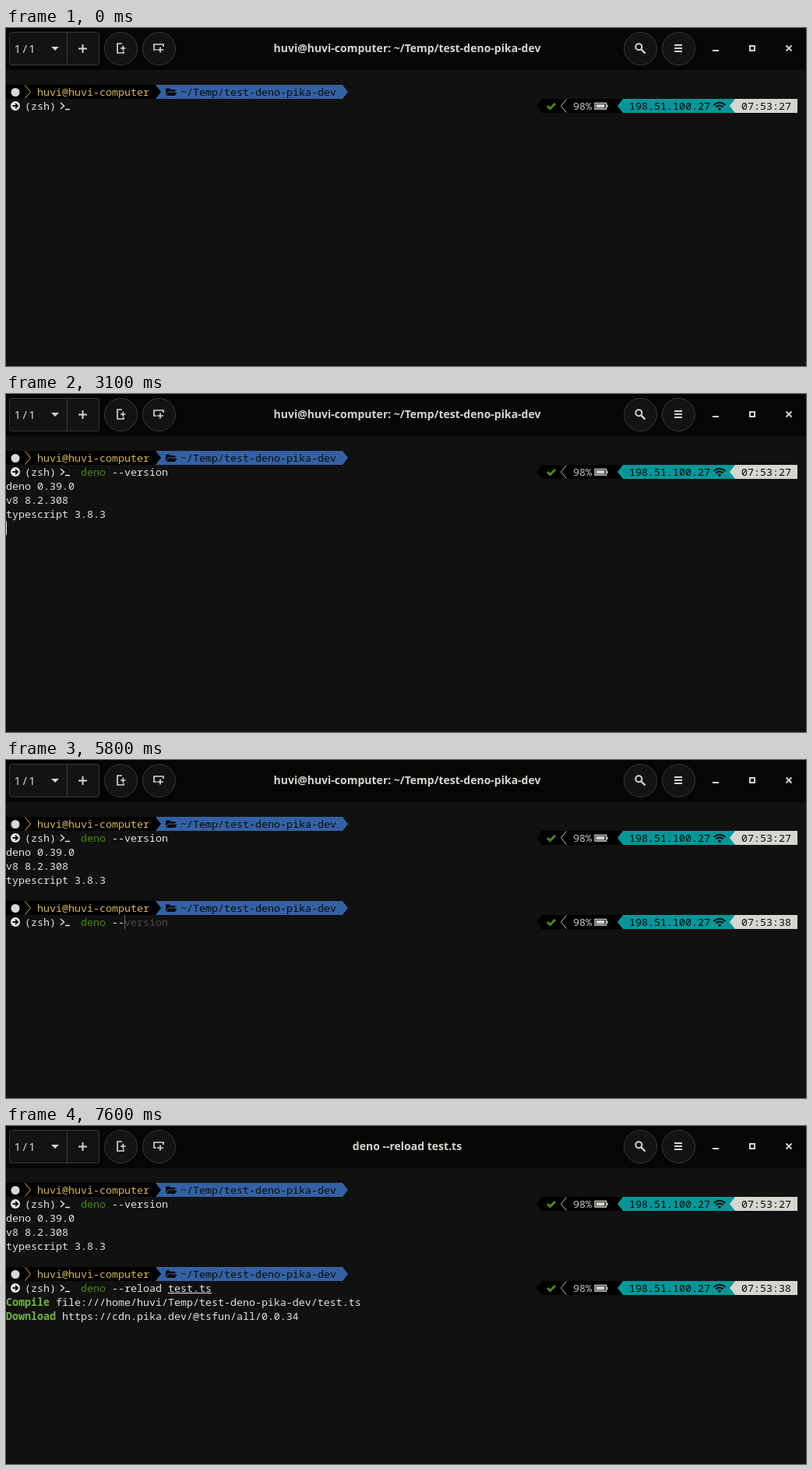
Write an HTML page that moves like this. It is 1027x434 px and loops after 8000 ms.

```html
<!DOCTYPE html>
<html lang="en">
<head>
<meta charset="utf-8">
<title>Terminal session</title>
<style>
  html, body { margin: 0; width: 100%; height: 100%; overflow: hidden; background: #111; }
  #stage { position: absolute; left: 0; top: 0; width: 1027px; height: 434px; overflow: hidden; background: #111; }
  svg { position: absolute; left: 0; top: 0; }
  .t {
    position: absolute; white-space: pre; color: #e4e4e0;
    font: 13.3333px/18px "Noto Sans Mono", monospace;
  }
  .user { color: #d7b45f; }
  .ink { color: #0b0b0b; }
  .pct { color: #c9c3bb; }
  .bad { color: #cc2020; font-weight: bold; }
  .ok { color: #468a16; }
  .log { color: #70b444; font-weight: bold; }
  .hint { color: #4b4b4b; }
  .file { text-decoration: underline; }
  #title {
    position: absolute; left: 215px; width: 600px; top: 16px; text-align: center;
    font: bold 14px/20px "Noto Sans", sans-serif; color: #d6d6d0; white-space: pre;
  }
  #count {
    position: absolute; left: 10.5px; top: 16px; letter-spacing: 2.5px;
    font: 14.667px/20px "Noto Sans", sans-serif; color: #d6d6d0;
  }
  #cursor { position: absolute; width: 1px; height: 18px; }
</style>
</head>
<body>
<div id="stage">
  <svg width="1027" height="434" viewBox="0 0 1027 434">
    <defs>
      <g id="prompt">
        <path d="M192 0h240l7 9-7 9h-240z" fill="#3461a3"/>
        <path d="M0 0h192l7 9-7 9H0z" fill="#000"/>
        <circle cx="12" cy="9.5" r="5.5" fill="#d8d8d4"/>
        <path d="M24.5 .5l7 8.5-7 8.5" fill="none" stroke="#d7b45f"/>
        <path d="M205 13.5V5.5q0-1 1-1h4l1.5 1.5h5q1 0 1 1v1.500h-8.500q-1 0-1.500 1zM206 14l2.500-4.500h11L217 14z" fill="#0b0b0b"/>
        <g transform="translate(0 18)">
          <circle cx="12" cy="9" r="6" fill="#e8e8e4"/>
          <path d="M8.500 9h6M12 5.800l3.200 3.200-3.200 3.200" fill="none" stroke="#111" stroke-width="1.800"/>
          <path d="M70 5l4.500 4-4.500 4M76 13.500h6" fill="none" stroke="#e4e4e0" stroke-width="1.400"/>
          <path d="M688 0h104v18H688l-7-9z" fill="#000"/>
          <path d="M792 0h144v18H792l-7-9z" fill="#069698"/>
          <path d="M936 0h80v18h-80l-7-9z" fill="#d3d7cf"/>
          <path d="M695 9l3.500 3.500 6.500-6.500" fill="none" stroke="#4a8a2a" stroke-width="3"/>
          <path d="M719.500 .5l-7 8.500 7 8.500" fill="none" stroke="#c9c3bb"/>
          <path d="M756 5.500h14.500v7.500H756zM772 7.500v3.500" fill="none" stroke="#d3d0cb" stroke-width="1.300"/>
          <path d="M757.500 7h11v4.500h-11z" fill="#d3d0cb"/>
          <path d="M908.500 8q7.500-6.500 15 0M911.300 10.500q4.700-4 9.400 0" fill="none" stroke="#0b0b0b" stroke-width="2"/>
          <circle cx="916" cy="13" r="1.800" fill="#0b0b0b"/>
        </g>
      </g>
    </defs>

    <rect width="1027" height="54" fill="#060606"/>
    <g fill="#131313" stroke="#393939">
      <rect x="4.500" y="5.500" width="115" height="42" rx="3"/>
      <path d="M78.500 5.500v42"/>
      <circle cx="147.500" cy="26.500" r="21"/>
      <circle cx="196.500" cy="26.500" r="21"/>
      <circle cx="814.500" cy="26.500" r="21"/>
      <circle cx="863.500" cy="26.500" r="21"/>
    </g>
    <path d="M58 24h10l-5 5z" fill="#d6d6d0"/>
    <g fill="none" stroke="#d6d6d0" stroke-width="2">
      <path d="M93 26.500h11M98.500 21v11"/>
      <path d="M149 20h-6v12h8v-2M147 26h6.500M150.300 22.700v6.600" stroke-width="1.700"/>
      <path d="M193 28h-3v-7h12v3M194 28h8M198 24.500v7" stroke-width="1.700"/>
      <circle cx="812.300" cy="24.300" r="4"/>
      <path d="M815.500 27.500l5 5" stroke-width="2.400"/>
      <path d="M858 22h10M858 26h10M858 30h10M907 29h8"/>
      <path d="M955 23h6v6h-6z"/>
      <path d="M1001.500 22.500l7 7M1008.500 22.500l-7 7" stroke-width="1.800"/>
    </g>

    <use href="#prompt" y="73"/>
    <use href="#prompt" y="181" data-from="3500"/>
  </svg>
  <div id="count">1/1</div>
  <div id="title"></div>
  <div id="cursor"></div>
</div>
<script>
const LOOP = 8000, CELL = 8, CMD_X = 96;
const stage = document.getElementById('stage');
const title = document.getElementById('title');
const cursor = document.getElementById('cursor');
const user = 'huvi', dir = '~/Temp/test-deno-pika-dev';
const version = 'deno --version', reload = 'deno --reload test.ts';

function put(x, y, html, cls = '', from = 0) {
  const el = document.createElement('div');
  el.className = 't ' + cls;
  el.style.left = x + 'px';
  el.style.top = y + 'px';
  el.innerHTML = html;
  el.dataset.from = from;
  stage.insertBefore(el, cursor);
  return el;
}

function prompt(y, clock, from) {
  put(40, y, `${user}@${user}-computer`, 'user', from);
  put(224, y, dir, 'ink', from);
  put(24, y + 18, '(zsh)', '', from);
  put(728, y + 18, '98%', 'pct', from);
  put(800, y + 18, '198.51.100.27', 'ink', from);
  put(944, y + 18, clock, 'ink', from);
}

prompt(73, '07:53:27', 0);
prompt(181, '07:53:38', 3500);
['deno 0.39.0', 'v8 8.2.308', 'typescript 3.8.3'].forEach((s, i) => put(0, 109 + 18 * i, s, '', 3100));
put(0, 217, `<span class="log">Compile</span> file:///home/${user}/Temp/test-deno-pika-dev/test.ts`, '', 7100);
put(0, 235, '<span class="log">Download</span> https://cdn.pika.dev/@tsfun/all/0.0.34', '', 7500);

// Each key is [time, characters typed so far]; history is searched in order for a hint.
const commands = [
  { y: 91, text: version, history: [reload, version],
    keys: [[600, 1], [1000, 2], [1100, 3], [1500, 4], [1700, 5], [1900, 6], [2000, 7],
           [2100, 8], [2300, 9], [2500, 10], [2600, 14]] },
  { y: 199, text: reload, history: [version, reload],
    keys: [[4000, 1], [4100, 2], [4200, 3], [4300, 4], [5000, 5], [5400, 6], [5800, 7],
           [5900, 8], [6000, 9], [6200, 10], [6300, 11], [6500, 12], [6700, 13], [7000, 21]] }
];

// Cursor moves: [time, x, y], hidden when x is missing.
const moves = [[0], [400, CMD_X, 91], [3000, 0, 109], [3100, 0, 163], [3500, CMD_X, 199],
               [3700], [7100, 0, 235], [7500, 0, 253], [7600]];
for (const c of commands) {
  c.el = put(CMD_X, c.y, '');
  for (const [time, n] of c.keys) moves.push([time, CMD_X + n * CELL, c.y, n < c.text.length]);
}
moves.sort((a, b) => a[0] - b[0]);

const timed = [...document.querySelectorAll('[data-from]')];
const latest = (list, t) => list.filter(e => e[0] <= t).pop();
const span = (cls, s) => `<span class="${cls}">${s}</span>`;

function commandHtml(c, n) {
  const typed = c.text.slice(0, n);
  const hint = c.history.find(h => h.startsWith(typed)).slice(n);
  const args = typed.slice(4).replace('test.ts', span('file', 'test.ts'));
  return span(n < 4 ? 'bad' : 'ok', typed.slice(0, 4)) + args + span('hint', hint);
}

function draw(t) {
  for (const el of timed) el.style.visibility = t >= +el.dataset.from ? 'visible' : 'hidden';
  for (const c of commands) {
    const key = latest(c.keys, t), n = key ? key[1] : 0;
    if (n !== c.shown) c.el.innerHTML = n ? commandHtml(c, n) : '';
    c.shown = n;
  }
  const [, x, y, overHint] = latest(moves, t);
  cursor.style.visibility = x === undefined ? 'hidden' : 'visible';
  cursor.style.left = x + 'px';
  cursor.style.top = y + 'px';
  cursor.style.background = overHint ? '#707070' : '#e8e8e4';
  const name = t < 7100 ? `${user}@${user}-computer: ${dir}` : reload;
  if (title.textContent !== name) title.textContent = name;
}

const start = performance.now();
function tick() {
  draw((performance.now() - start) % LOOP);
  requestAnimationFrame(tick);
}
tick();
</script>
</body>
</html>
```
